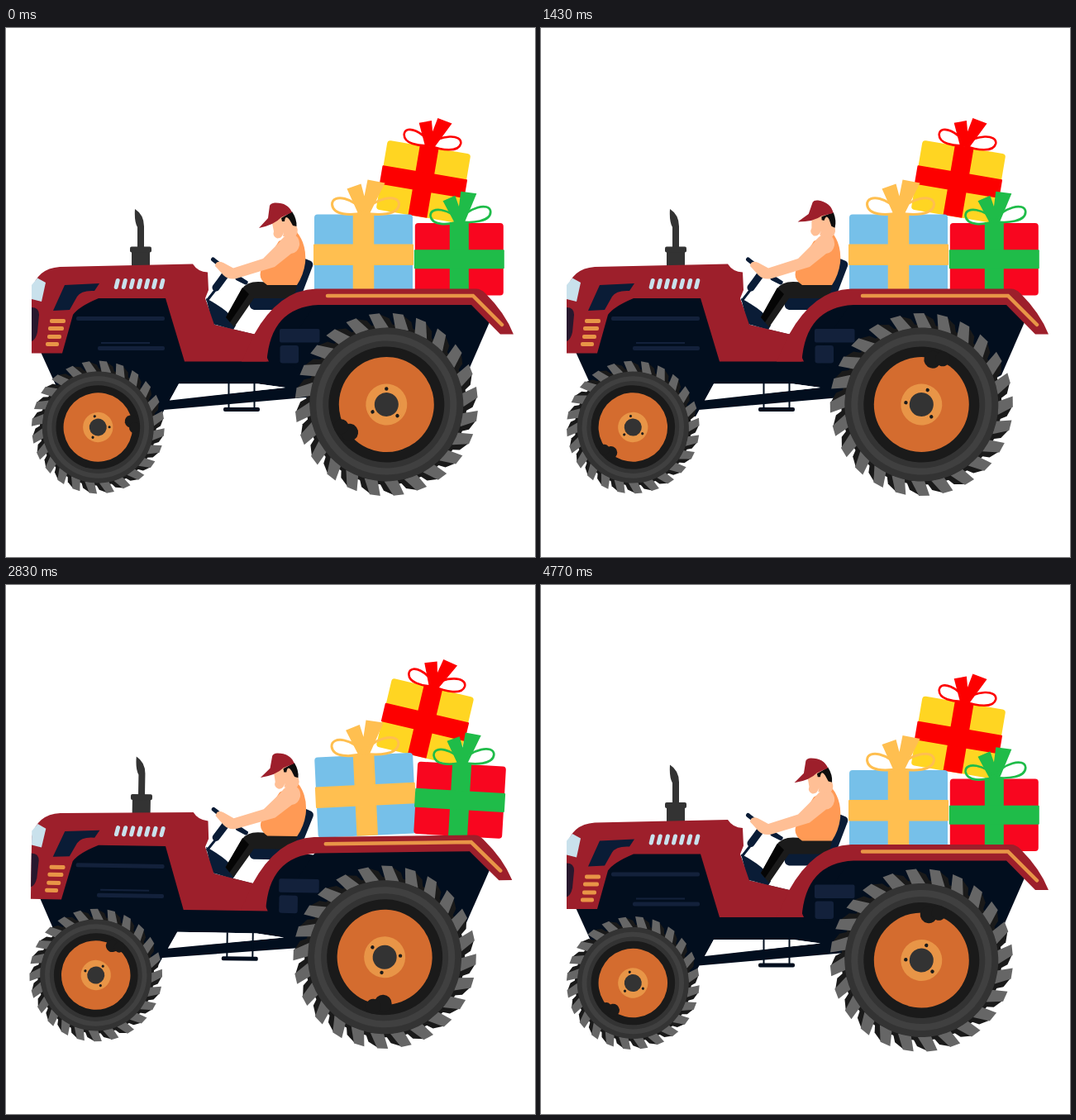
Animation, 640 px wide and 640 px high, one loop 4810 ms. Source, as an HTML page:

```html
<!DOCTYPE html>
<html lang="en">
<head>
<meta charset="utf-8">
<title>Tractor with gifts</title>
<style>
html, body { margin: 0; width: 100%; height: 100%; overflow: hidden; background: #fff; }
svg { display: block; width: 100vw; height: 100vh; }
.red { fill: #9d1f2b; }
.dark { fill: #020e1e; }
.navy { fill: #0a1c36; }
.line { fill: #13213b; }
.iron { fill: #333; }
.glass { fill: #c9e1ec; }
.amber { fill: #e89547; }
.skin { fill: #ffbf95; }
</style>
</head>
<body>
<svg viewBox="0 0 640 640">
  <g id="all">
    <g id="gifts"></g>
    <g id="body">
      <path class="dark" d="M42 392 62 436 150 470H187L209 430.500H305L338 435 185 452V462.500L362 447 400 460 430 340 325 330 H240V320H70Z"/>
      <path d="M209 430.500H305L338 435 199 449.500Z" fill="#fff"/>
      <path d="M269.500 430V461M300.500 430V461" stroke="#020e1e" stroke-width="2"/>
      <rect class="dark" x="263" y="459" width="44" height="5" rx="2"/>
      <path d="M244 296 241 328 252 359 302 371 330 335 345 322V290H246Z" fill="#fff"/>

      <path class="navy" d="M242 327 Q268 341 273 350L278 360 275 365 250 358Z"/>
      <path class="navy" d="M358 282Q359 278 363 279.500L369 282Q372 284 371 288L358 322Q354 341 340 341H300Q292 339 296 328L298 324H344Z"/>
      <g id="driver">
        <path d="M352 309 305 307Q291 307 285 316L266 350 276 362 300 327H340Q351 326 352 309Z" fill="#1b1b1b"/>
        <path d="M286 314 266 350 271 356 294 322Z" fill="#050505"/>
        <path d="M330 258 352 247Q364 262 362 284 360 299 352 311H316Q304 303 309 292 319 281 322 271Z" fill="#ff9a55"/>
        <path d="M250.500 280 258 286M280 303 290 308" stroke="#0a1c36" stroke-width="5" stroke-linecap="round"/>
        <path d="M250 280 292 308M243 330 254 316" stroke="#0a1c36" stroke-width="3"/>
        <path d="M254 314 265 299" stroke="#0a1c36" stroke-width="9" stroke-linecap="round"/>
        <path class="skin" d="M331 259Q338 248 347 249 356 253 355 263 353 272 345 273L325 289 279 303Q269 305 263 299L253 288Q254 280 263 284L275 290.500 311 279Z"/>
        <g id="head">
          <path class="skin" d="M322 236 334 227H345L352 241Q355 248 348 254L335 252 336 247Q334 255 328 254.500 322 252 324 246Z"/>
          <path d="M333 230 346 222Q352 231 351.500 240L347 239 343 232Q338 225 337 234L334 234Z" fill="#0d0d0d"/>
          <path class="red" d="M306 242 317 230 319 215Q320 212 325 211.500 341 211 346 223L333 229Q325 238 306 242Z"/>
        </g>
      </g>

      <path class="iron" d="M152 289V271H174V289ZM159 267V241Q155 234 156 219 167 226 167 240V267Z"/>
      <rect class="iron" x="150" y="264.500" width="26" height="7" rx="2"/>
      <path class="red" d="M31 393.500V318Q37 291 65 289L226 285.500Q232 295 244 295.500L245 317 241 327 252 359 303 371 318 403.500H216L193 327H112Q88 337 81 347L68 393.500Z"/>
      <path class="glass" d="M31 311 38 302.500 48 308 43 331 31 328Z"/>
      <path d="M31 338Q40 338 40 347L38 368Q36 377 31 379Z" fill="#28182e"/>
      <path class="navy" d="M71 311 113 309 107 318Q91 317 86 325L77 341 57 342Z"/>
      <g class="amber">
        <rect x="53" y="352" width="19" height="5" rx="2"/>
        <rect x="51" y="361" width="19" height="5" rx="2"/>
        <rect x="50" y="371" width="17" height="5" rx="2"/>
        <rect x="48" y="380" width="16" height="5" rx="2"/>
      </g>
      <g id="slits" stroke="#c9e1ec" stroke-width="5" stroke-linecap="round"></g>
      <g class="line">
        <rect x="85" y="349" width="107" height="5" rx="2"/>
        <rect x="115" y="380" width="59" height="2"/>
        <rect x="111" y="385" width="81" height="5" rx="2"/>
      </g>
      <path id="rear" class="dark" d="M380 325H570L588 349 557 420 500 450 400 440 330 400Z"/>
      <g id="fender">
        <path class="red" d="M285 403.500 300 371Q330 317 375 315.500H568Q574 315 580 321 604 345 614 370.500H598L563 335H378Q320 338 315.500 403.500Z"/>
        <path d="M389 324H565L600 359" fill="none" stroke="#e89547" stroke-width="4.500" stroke-linecap="round"/>
      </g>
      <rect class="line" x="331" y="364" width="48.500" height="16.500" rx="2"/>
      <rect class="line" x="331.500" y="384" width="22.500" height="21.500" rx="3"/>
    </g>
    <g id="wheels"></g>
  </g>
</svg>
<script>
const $ = id => document.getElementById(id);
const place = (el, transform) => el.setAttribute('transform', transform);
const NS = 'http://www.w3.org/2000/svg';
const repeat = (n, draw) => Array.from({ length: n }, (_, i) => draw(i)).join('');

function addGroup(parent, markup) {
  const g = document.createElementNS(NS, 'g');
  g.innerHTML = markup;
  return $(parent).appendChild(g);
}

$('slits').innerHTML = repeat(7, i =>
  `<path d="M${133.2 + i * 9.1} 313.500l2-8"/>`);

// Each gift rests at x, y, tilted; dx, dy and turn are its travel at the top of a hop.
const gifts = [
  { x: 505, y: 186, w: 102, h: 85, tilt: 9.6, paper: '#ffd522', ribbon: '#fd0000', band: 23, bow: 0, dx: 7.5, dy: -71, turn: 14 },
  { x: 432.5, y: 274.2, w: 119, h: 97.5, tilt: 0, paper: '#76c0e9', ribbon: '#ffbf50', band: 25.5, bow: 0, dx: 9, dy: -69, turn: -10.4 },
  { x: 548.3, y: 279.8, w: 107, h: 87.5, tilt: 0, paper: '#f8061f', ribbon: '#1fbc49', band: 23, bow: -4, dx: 3, dy: -68, turn: 12.6 }
];
for (const g of gifts) {
  const { w, h, band } = g;
  g.el = addGroup('gifts', `
    <rect x="${-w / 2}" y="${-h / 2}" width="${w}" height="${h}" rx="4" fill="${g.paper}"/>
    <g fill="${g.ribbon}">
      <rect x="${-band / 2}" y="${-h / 2 - 1}" width="${band}" height="${h + 1}"/>
      <rect x="${-w / 2 - 1}" y="${-band / 2}" width="${w + 2}" height="${band}" rx="1"/>
      <g transform="translate(0 ${-h / 2 - 2}) scale(${w / 119}) rotate(${g.bow})">
        <path d="M-6 2-20-29-3-35 1-20 5-40 26-36 7 2Z"/>
        <path d="M0 0C-10-18-38-24-38-10-37 3-16 4 0 0C12-18 43-24 43-10 42 3 18 4 0 0" fill="none" stroke="${g.ribbon}" stroke-width="3"/>
      </g>
    </g>`);
}

const disc = (r, color) => `<circle r="${r}" fill="${color}"/>`;
const dot = (angle, at, r, color) =>
  `<circle cx="${at}" r="${r}" fill="${color}" transform="rotate(${angle})"/>`;
const LUGS = 24;
const wheelArt =
  disc(97, '#1a1a1a') +
  repeat(LUGS, i => `<g transform="rotate(${i * 360 / LUGS})">
    <path d="M4-110 16-103 21-90 8-90Z" fill="#1a1a1a"/>
    <path d="M-8-110.500 5-110.500 14-92-2-92Z" fill="#666"/></g>`) +
  disc(93, '#333') + disc(85, '#404040') + disc(77, '#333') + disc(70, '#1a1a1a') +
  disc(57.5, '#d46c2f') + dot(0, 56, 10.5, '#1a1a1a') + dot(11, 61, 9, '#1a1a1a') +
  disc(25, '#e89547') + disc(14.5, '#333') +
  [-97, 9, 127].map(a => dot(a, 19, 2.2, '#1a1a1a')).join('');

const wheels = [
  { x: 111.3, y: 483, size: 0.726, angle: -10 },
  { x: 460.3, y: 455.5, size: 1, angle: 143 }
];
for (const w of wheels) w.el = addGroup('wheels', wheelArt);

const LOOP = 4810, HOP = 14.04, HOPS = [21, 70], SPIN = -26.083;

// The motion runs at 25 steps a second, shown on a 30 per second clock.
function stepAt(ms) {
  const tick = Math.min(143, Math.floor((ms + 3.4) * 0.03));
  return Math.ceil(tick * 5 / 6 - 0.5 - 1e-6);
}

function draw(ms) {
  const k = stepAt(ms);
  const start = HOPS.find(s => k >= s && k < s + HOP);
  const u = start === undefined ? 0 : (k - start) / HOP;
  const lift = 4 * u * (1 - u);
  const sway = Math.sin(2 * Math.PI * u);
  const wave = period => (1 - Math.cos(2 * Math.PI * k / period)) / 2;
  const pitch = `rotate(${2.18 * sway} 285 326)`;

  place($('all'), `translate(0 ${-3 * wave(4)})`);
  place($('body'), `translate(0 ${-30 * lift}) ${pitch}`);
  place($('rear'), `rotate(${-1.9 * sway} 316 403)`);
  place($('fender'), `translate(0 ${-3.4 * lift}) rotate(${-3.8 * sway} 316 403)`);
  place($('driver'), `translate(0 ${5 * lift})`);
  place($('head'), `rotate(${11.5 * wave(8)} 345 261)`);
  for (const g of gifts)
    place(g.el, `translate(${g.x + g.dx * lift} ${g.y + g.dy * lift}) rotate(${g.tilt + g.turn * lift})`);
  for (const w of wheels)
    place(w.el, `translate(0 ${-25 * lift}) ${pitch} translate(${w.x} ${w.y}) rotate(${w.angle + SPIN * k}) scale(${w.size})`);
}

const begin = performance.now();
function tick() {
  draw((performance.now() - begin) % LOOP);
  requestAnimationFrame(tick);
}
tick();
</script>
</body>
</html>
```
